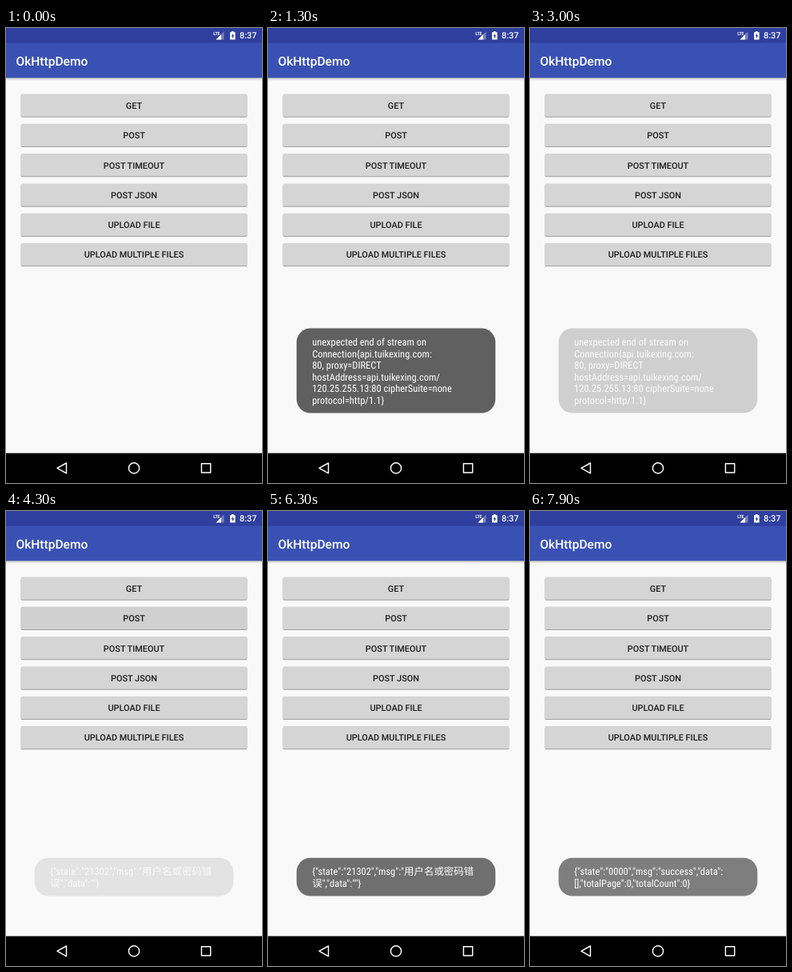
Write an HTML page that moves like this. It is 320x569 px and loops after 8 s.

```html
<!DOCTYPE html>
<html lang="en">
<head>
<meta charset="utf-8">
<title>OkHttpDemo</title>
<style>
  html, body { margin: 0; width: 100%; height: 100%; overflow: hidden; background: #f9f9f9; }
  svg { display: block; width: 100%; height: 100%; font-family: Roboto, sans-serif; }
  text { text-rendering: geometricPrecision; }
  .title { font-size: 15.56px; font-weight: 500; fill: #fff; }
  .clock { font-size: 10.89px; font-weight: 500; fill: #fff; }
  .network { font: 700 5.8px "Roboto Condensed", Roboto, sans-serif; font-stretch: 75%; fill: #fff; }
  .label { font-size: 10.89px; font-weight: 500; fill: #1c1c1c; text-anchor: middle; }
  .face { fill: #d5d5d5; filter: drop-shadow(0 1px .6px rgba(0, 0, 0, .36)); }
  .toast { opacity: 0; }
  .toast rect { fill: #606060; }
  .toast text {
    font: 12.44px "Roboto Condensed", Roboto, "Noto Sans CJK SC", sans-serif;
    font-stretch: 75%;
    fill: #fff;
  }
  .nav { fill: none; stroke: #fff; stroke-width: 1.45; stroke-linejoin: round; }
</style>
</head>
<body>
<svg id="stage" viewBox="0 0 320 569">
  <defs>
    <linearGradient id="shade" x2="0" y2="1">
      <stop stop-opacity=".36"/>
      <stop offset=".4" stop-opacity=".12"/>
      <stop offset="1" stop-opacity="0"/>
    </linearGradient>
  </defs>
  <rect width="320" height="569" fill="#f9f9f9"/>
  <rect y="62" width="320" height="4" fill="url(#shade)"/>
  <rect y="18" width="320" height="44.2" fill="#3a51b4"/>
  <rect width="320" height="18.67" fill="#2f3f9f"/>
  <text class="title" x="12.44" y="46.6">OkHttpDemo</text>

  <text class="network" x="259.2" y="8.8">LTE</text>
  <path d="M262.5 14.5h10v-10z" fill="#fff" opacity=".35"/>
  <path d="M262.5 14.5h6.5v-6.5z" fill="#fff"/>
  <path d="M280 5.2h2v-1.2h2.6v1.2h2v9.3h-6.6z" fill="#fff"/>
  <path d="M283.8 6.4l-2.2 4h1.4v2.8l2.2-4h-1.4z" fill="#2f3f9f"/>
  <text class="clock" x="292" y="13.4">8:37</text>

  <g id="buttons"></g>
  <g id="toasts"></g>

  <rect y="531.67" width="320" height="37.33"/>
  <g class="nav">
    <path d="M64 550.4l11.5-6.4v12.8z"/>
    <circle cx="160" cy="550.4" r="6.6"/>
    <rect x="244.4" y="544.7" width="11.3" height="11.3"/>
  </g>
</svg>
<script>
const LOOP = 8000;
const LINE = 14.55;
const TOAST_BOTTOM = 481.6;

function add(parent, tag, attrs, text = "") {
  const el = document.createElementNS("http://www.w3.org/2000/svg", tag);
  for (const [key, value] of Object.entries(attrs)) el.setAttribute(key, value);
  el.textContent = text;
  return parent.appendChild(el);
}

// Each [time, value] step holds until the next one.
function hold(el, prop, steps) {
  const frames = steps.map(([time, value]) =>
    ({ offset: time / LOOP, [prop]: value, easing: "steps(1)" }));
  el.animate(frames, { duration: LOOP, iterations: Infinity });
}

const series = (start, values) => values.map((v, i) => [start + i * 100, v]);
const gray = level => `rgb(${level}, ${level}, ${level})`;

const labels = ["GET", "POST", "POST TIMEOUT", "POST JSON", "UPLOAD FILE", "UPLOAD MULTIPLE FILES"];
const faces = labels.map((label, i) => {
  const y = 82.44 + i * 37.33;
  const face = add(buttons, "rect",
    { class: "face", x: 18.67, y, width: 282.67, height: 28.2, rx: 1.56 });
  add(buttons, "text", { class: "label", x: 160, y: y + 18.4 }, label);
  return face;
});

const presses = [
  [0, [[0, 213], ...series(700, [206, 200, 202, 204, 208, 211, 213]),
       ...series(7000, [205, 203, 213])]],
  [1, [[0, 213], ...series(3800, [205, 202, 208]), [4700, 213]]],
];
for (const [index, steps] of presses)
  hold(faces[index], "fill", steps.map(([time, level]) => [time, gray(level)]));

const messages = [
  {
    lines: ["unexpected end of stream on", "Connection{api.tuikexing.com:", "80, proxy=DIRECT",
            "hostAddress=api.tuikexing.com/", "120.25.255.13:80 cipherSuite=none", "protocol=http/1.1}"],
    fade: [...series(900, [.13, .41, .76, .95, 1]), ...series(2800, [.9, .6, .27, 0])],
  },
  {
    lines: ['{"state":"21302","msg":"用户名或密码错', '误","data":""}'],
    fade: [...series(4300, [.14, .46, .8, .96, 1]), ...series(6300, [.9, .65, .34, .09, 0])],
  },
  {
    lines: ['{"state":"0000","msg":"success","data":', '[],"totalPage":0,"totalCount":0}'],
    fade: series(7700, [.14, .46, .8]),
  },
];
for (const { lines, fade } of messages) {
  const height = lines.length * LINE + 18.8;
  const top = TOAST_BOTTOM - height;
  const toast = add(toasts, "g", { class: "toast" });
  add(toast, "rect", { x: 35.7, y: top, width: 248.6, height, rx: 17.5 });
  lines.forEach((line, i) =>
    add(toast, "text", { x: 55.2, y: top + 21.6 + i * LINE }, line));
  hold(toast, "opacity", [[0, 0], ...fade]);
}
</script>
</body>
</html>
```
